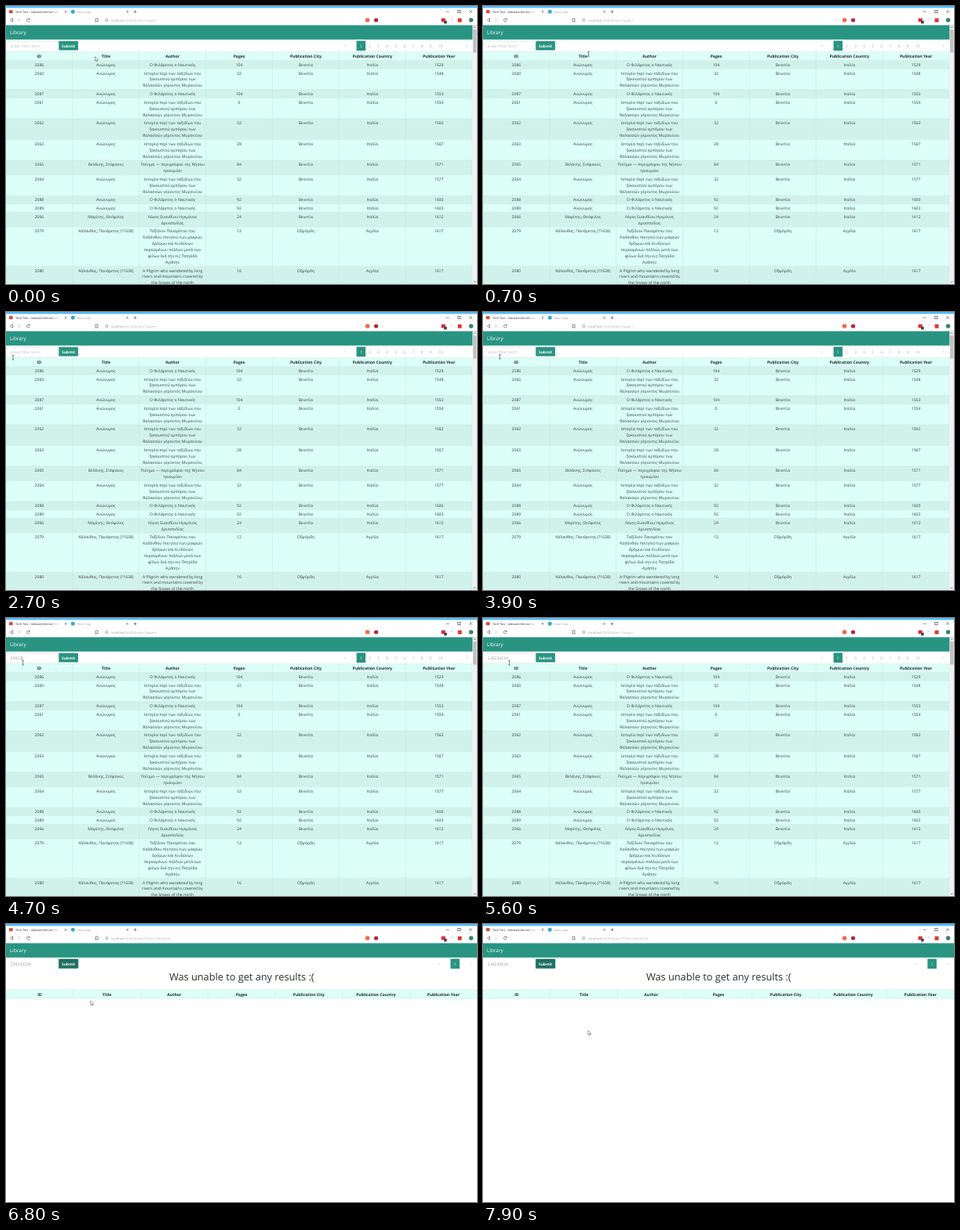
Animation of 600x355 px, one loop 8 s. Source, as an HTML page:

```html
<!DOCTYPE html>
<html lang="en">
<head>
<meta charset="utf-8">
<title>Library</title>
<style>
  html, body { margin: 0; width: 100%; height: 100%; overflow: hidden; background: #fff; }
  svg { display: block; width: 100vw; height: 100vh; font-family: "Open Sans", "Noto Sans", sans-serif; text-rendering: geometricPrecision; }
</style>
</head>
<body>
<svg id="stage" viewBox="0 0 600 355"></svg>
<script>
const TEAL = '#289481', DARK = '#1e6f61', LIGHT = '#dcfff7', STRIPE = '#d1f2eb', LINE = '#bfe6dd';

// SVG helpers; text is centred vertically on y
const rect = (x, y, w, h, fill, more = '') =>
  `<rect x="${x}" y="${y}" width="${w}" height="${h}" fill="${fill}" ${more}/>`;
const dot = (x, y, r, fill) => `<circle cx="${x}" cy="${y}" r="${r}" fill="${fill}"/>`;
const path = (d, stroke = '#444', width = .6, fill = 'none') =>
  `<path d="${d}" stroke="${stroke}" stroke-width="${width}" fill="${fill}"/>`;
const text = (s, x, y, size, fill = '#333', more = '') =>
  `<text x="${x}" y="${y + size * .36}" font-size="${size}" fill="${fill}" ${more}>${s}</text>`;
const MID = 'text-anchor="middle"', BOLD = 'font-weight="700"';
const group = (id, body, more = '') => `<g id="${id}" ${more}>${body}</g>`;

const HEADS = ['ID', 'Title', 'Author', 'Pages', 'Publication City', 'Publication Country', 'Publication Year'];
const ANON = 'Ανώνυμος', VENICE = ['Βενετία', 'Ιταλία'], OXFORD = ['Οξφόρδη', 'Αγγλία'];
const SAILOR = 'Ο Φιλάρετος ο Ναυτικός';
const TRAVELS = 'Ιστορία περί των ταξιδίων του|ξακουστού εμπόρου των|θαλασσών γέροντος Μυρσινίου';
const POET = 'Κάλανθος, Πανάρετος (?1638)';
const ROWS = [
  [2086, ANON, SAILOR, 104, ...VENICE, 1529],
  [2060, ANON, TRAVELS, 32, ...VENICE, 1548],
  [2087, ANON, SAILOR, 104, ...VENICE, 1553],
  [2061, ANON, TRAVELS, 0, ...VENICE, 1554],
  [2062, ANON, TRAVELS, 32, ...VENICE, 1562],
  [2063, ANON, TRAVELS, 28, ...VENICE, 1567],
  [2065, 'Βελάνης, Στέφανος', 'Ποίημα — περιγράφον της Νήσου|τρικυμίαν', 84, ...VENICE, 1571],
  [2064, ANON, TRAVELS, 32, ...VENICE, 1577],
  [2088, ANON, SAILOR, 92, ...VENICE, 1600],
  [2089, ANON, SAILOR, 92, ...VENICE, 1603],
  [2066, 'Μαρίτης, Θεόφιλος', 'Λόγος Ευανθίου Ηγεμόνος|Δρυοπολίας', 24, ...VENICE, 1612],
  [2079, POET, 'Ταξίδιον Παναρέτου του|Καλάνθου ποιητού των μακρών|δρόμων και Κινδύνων|περασμένων πολλών μετά των|φίλων διά την εις Πατρίδα|Αγάπην', 12, ...OXFORD, 1617],
  [2080, POET, 'A Pilgrim who wandered by long|rivers and mountains covered by|the Snows of the north', 16, ...OXFORD, 1617]
];

function table(top, width, rows) {
  const col = width / 7, lineH = 7.92;
  let y = top + 10.9, edges = `M0 ${top}H${width}M0 ${y}H${width}`;
  let out = rect(0, top, width, 10.9, LIGHT), words = '';
  HEADS.forEach((h, i) => words += text(h, (i + .5) * col, top + 5.6, 5.08, '#1c2b28', MID + BOLD));
  rows.forEach((row, n) => {
    const h = 2.75 + lineH * row[2].split('|').length;
    out += rect(0, y, width, h, n % 2 ? LIGHT : STRIPE);
    row.forEach((cell, i) => String(cell).split('|').forEach((s, k) =>
      words += text(s, (i + .5) * col, y + 5.4 + k * lineH, 5.1, '#35443f', MID)));
    y += h;
    edges += `M0 ${y}H${width}`;
  });
  for (let i = 0; i < 8; i++) edges += `M${i * col} ${top}V${y}`;
  return out + path(edges, LINE, .5) + words;
}

function pager(first, pages, right) {
  let out = rect(first - 5.7, 44.4, 11.5, 12.6, TEAL);
  for (let i = 1; i <= pages; i++)
    out += text(i, first + (i - 1) * 11.1 + (i > 9 ? 1.5 : 0), 51, 5, i > 1 ? '#a9b3b1' : '#fff', MID);
  [['«', first - 20.5], ['‹', first - 10.5], ['›', right - 17], ['»', right - 7]].forEach(([s, x], i) =>
    out += text(s, x, 50.5, 4.6, i % 3 ? '#e4e4e4' : '#b5b5b5', MID));
  return out;
}

const cross = (x, y, r) => path(`M${x - r} ${y - r}l${2 * r} ${2 * r}m0 ${-2 * r}l${-2 * r} ${2 * r}`);

const browser =
  rect(0, 0, 600, 2.5, '#55b9fb') +
  rect(4, 5.2, 4.6, 4, '#d84a3e') + text('Tech Test - tobiwald.fennor<tspan fill="#aaa">@m</tspan>', 12, 7.3, 3.8) + cross(76, 7.3, 1.3) +
  dot(85.2, 7.3, 2.5, '#3aa9c4') + text('React App', 90.5, 7.3, 3.8, '#a5a5a5') + cross(154.5, 7.3, 1.3) +
  path('M162.5 7.3h4M164.5 5.3v4M560.5 7.3h4') + rect(575.8, 5.6, 3.2, 3.2, 'none', 'stroke="#333" stroke-width=".6"') + cross(592, 7.2, 1.7) +
  path('M8.6 15.7L5.6 18l3 2.3zM30 16.8a2 2 0 1 0 .2 2.2M30.2 15.8v1.6h-1.6M114 16h3v4.5l-1.5-1.2l-1.5 1.2z') +
  path('M16 15.7l3 2.3l-3 2.3z', '#ccc') +
  path('M126.5 18a1.8 1.8 0 1 0 3.6 0a1.8 1.8 0 1 0-3.6 0M128.3 17.5v1.5', '#777', .5) +
  dot(460.5, 18, 2.8, '#f26b45') + dot(471.5, 18, 2.6, '#b3263c') +
  rect(554.5, 15.7, 5.2, 4.6, '#d62f3a') + rect(558, 18.8, 3.6, 3.6, '#444') +
  rect(566, 16, 3, 2, '#e6e6e6') + rect(575.5, 15.7, 5, 5, '#d93a32') + dot(592.5, 18, 2.7, '#2f8566') +
  rect(0, 24.5, 600, 18.3, TEAL) + text('Library', 5, 33.8, 6.4, '#fff');

const scrollbar = rect(594.3, 24.5, 5.7, 331, '#f1f1f1') + rect(595, 30, 4.4, 29.5, '#c1c1c1') +
  path('M595.8 28l1.4-1.6l1.4 1.6M595.8 351.5l1.4 1.6l1.4-1.6', '#666', .7);

const hand = 'M-1.2 2V-2.6q.8-1 1.5 0V0q2.6-.2 3.2 1.2v2q-.4 1.1-.9 1.8H-1Q-2.2 3.4-3 1.8q0-1 1.8.2z';

document.getElementById('stage').innerHTML =
  rect(0, 0, 600, 355, '#fff') + browser +
  `<text id="url" x="134.3" y="19.5" font-size="4.15" fill="#b8b8b8"><tspan fill="#999">localhost</tspan><tspan id="address"></tspan></text>` +
  group('list', pager(452.2, 10, 594) + table(58.7, 594, ROWS) + scrollbar) +
  group('empty', pager(572, 1, 600) + table(84.1, 600, []) +
    text('Was unable to get any results :(', 300.3, 67, 12.75, '#26302e', MID + 'font-weight="500"')) +
  rect(1, 45, 66, 12, 'none', 'id="box" stroke="#d9dfe2" stroke-width=".5"') +
  `<text id="field" x="5.8" y="52.7" font-size="5.1"></text>` +
  rect(0, 48.2, .4, 5.8, '#555', 'id="caret"') +
  rect(66.7, 44.2, 25.8, 13, '#94c9c0', 'id="ring" rx="1.2"') +
  rect(67.3, 44.8, 24.6, 11.8, TEAL, 'id="button" rx=".8"') + text('Submit', 79.6, 50.8, 4.8, '#fff', MID + BOLD) +
  group('cursor',
    group('arrow', path('M0 0V5.4L1.3 4.3L2.2 6.3L3.1 5.9L2.2 4H3.9Z', '#333', .45, '#fff')) +
    group('beam', path('M-1.1-2.9H1.1M0-2.9V2.9M-1.1 2.9H1.1', '#333', .6)) +
    group('hand', path(hand, '#333', .5, '#fff')));

const $ = id => document.getElementById(id);
const show = (id, on) => $(id).style.display = on ? '' : 'none';

// [ms, x, y] of the pointer
const TRACK = [[0, 113.5, 64.7], [500, 113.5, 64.7], [900, 155.5, 58], [1900, 156, 58], [2200, 5, 58],
  [2300, 5, 58], [2800, 10, 58], [2900, 10, 58], [3300, 21.5, 57], [5500, 21.5, 57], [5600, 33.5, 57],
  [6400, 82, 58], [6700, 82, 58], [6800, 107.8, 98], [7000, 133.8, 136], [8000, 133.8, 136]];

function pointer(t) {
  const i = TRACK.findIndex(k => k[0] > t);
  const [t0, x0, y0] = TRACK[i - 1], [t1, x1, y1] = TRACK[i], p = (t - t0) / (t1 - t0);
  return [x0 + (x1 - x0) * p, y0 + (y1 - y0) * p];
}

function caretOn(t) {
  if (t < 3300) return t >= 100 && Math.floor((t - 100) / 500) % 2 === 0;
  return t < 3800 || (t >= 4400 && t < 5600);
}

function draw(now) {
  const t = Math.floor(now % 8000 / 100) * 100;
  const [x, y] = pointer(t);
  const sent = t >= 6500, done = t >= 6800;
  const over = t >= 5600 && x > 67;
  const typed = '234234234'.slice(0, t < 4400 ? 0 : (t - 4400) / 100 + 2);

  show('list', !done);
  show('empty', done);
  show('box', t < 6400);
  show('ring', sent);
  $('button').setAttribute('fill', over ? DARK : TEAL);
  $('address').textContent = ':3000/books/?' + (sent ? 'Title=234234234' : 'page=1');
  $('field').textContent = typed || 'Enter filter term';
  $('field').setAttribute('fill', typed ? '#979797' : '#bdc2c5');
  $('caret').setAttribute('x', 5.9 + typed.length * 2.92);
  show('caret', caretOn(t));

  const shape = t < 700 || done ? 'arrow' : over ? 'hand' : 'beam';
  for (const id of ['arrow', 'beam', 'hand']) show(id, id === shape);
  $('cursor').setAttribute('transform', `translate(${x} ${y})`);
}

function loop() {
  draw(performance.now());
  requestAnimationFrame(loop);
}
loop();
</script>
</body>
</html>
```
